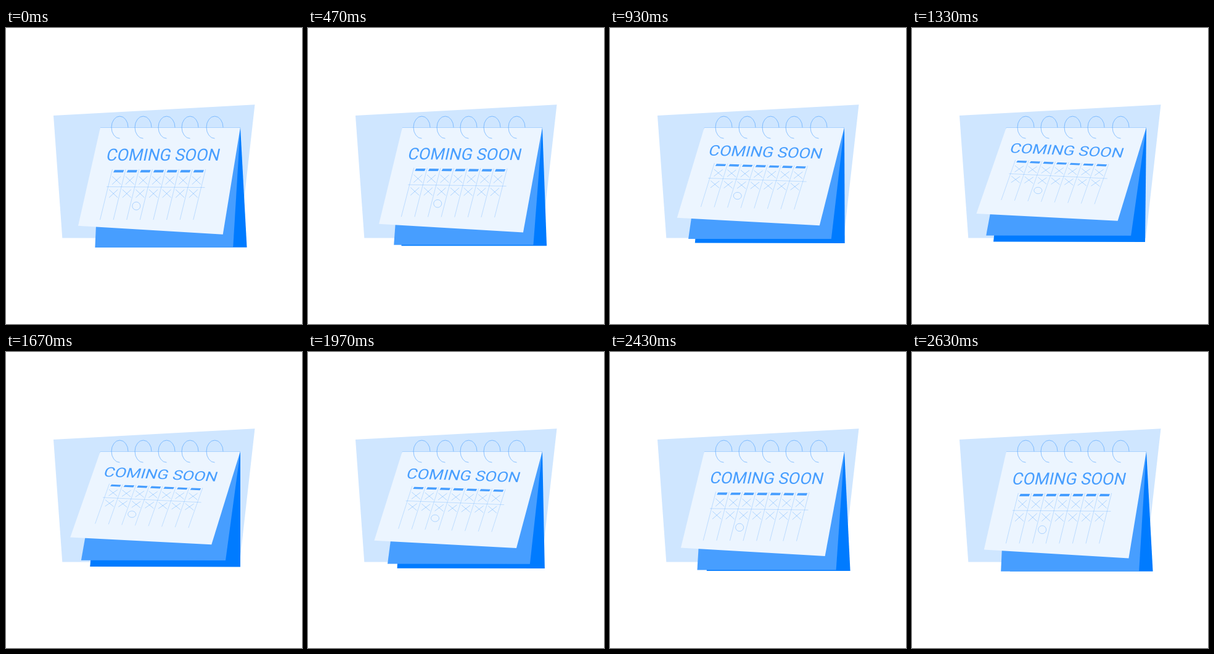
Animation of 480 by 480 pixels, one loop 2670 ms. Source, as an HTML page:

```html
<!DOCTYPE html>
<html lang="en">
<head>
<meta charset="utf-8">
<title>Coming soon calendar</title>
<style>
  html, body { margin: 0; height: 100%; overflow: hidden; background: #fff; }
  svg { display: block; width: 100%; height: 100%; }
  .thin { fill: none; stroke: #479eff; stroke-width: .4; }
  text { font: 27px Roboto, sans-serif; fill: #479eff; }
</style>
</head>
<body>
<svg viewBox="0 0 480 480">
  <path fill="#cfe6ff" d="M77 142 403.5 124.3 379 341 91.3 340.5z"/>
  <path id="back" fill="#007bff"/>
  <path id="middle" fill="#479eff"/>
  <path id="front" fill="#ecf5ff"/>
  <path class="thin" d="M153 161.5H380"/>
  <g id="content">
    <text transform="translate(161.4 215) skewX(-12)" textLength="auto">COMING SOON</text>
    <path id="bars" fill="#479eff"/>
    <path id="grid" class="thin" opacity=".75"/>
    <path id="crosses" class="thin"/>
    <circle class="thin" cx="211.3" cy="288.6" r="6.5"/>
  </g>
  <path id="rings" class="thin" style="stroke-width: .6"/>
</svg>
<script>
const LOOP = 2670;
const $ = id => document.getElementById(id);
const mix = (a, b, p) => a + (b - a) * p;
const smooth = (from, to, t) => {
  const u = Math.min(1, Math.max(0, (t - from) / (to - from)));
  return u * u * (3 - 2 * u);
};

// Bottom corners [left x, y, right x, y] at rest and lifted; times of rise and fall.
const sheets = [
  { id: 'back', rest: [159, 355.7, 390.6, 355.8], lifted: [132, 346.5, 378, 347], rise: [20, 1320], fall: [1340, 2660] },
  { id: 'middle', rest: [144.4, 355.9, 368.2, 355.9], lifted: [120, 336.3, 355, 336.5], rise: [80, 1400], fall: [1460, 2700] },
  { id: 'front', rest: [117, 320.8, 351.7, 334.8], lifted: [104, 300.3, 333, 312], rise: [150, 1470], fall: [1590, 2720] },
];
const restMatrix = [1, 0, 0, 1, 0, 0];
const liftedMatrix = [1, .045, -.038, .8, 3.8, 22.3];

const cross = (x, y) => `M${x - 7} ${y - 6.5}l14 13m0-13l-14 13`;
let bars = '', crosses = '', grid = 'M163 257.4 322.5 258.6';
for (let i = 0; i < 8; i++) {
  const x = i * 21.6;
  grid += `M${172.5 + x} 229l-20 82`;
  if (i === 7) break;
  bars += `M${174 + x} 234.3l2-4h15.4l-1.6 4z`;
  crosses += cross(179.2 + x, 247.1) + cross(174.2 + x, 268.5);
}
$('bars').setAttribute('d', bars);
$('grid').setAttribute('d', grid);
$('crosses').setAttribute('d', crosses);
$('rings').setAttribute('d', [184.5, 222.5, 260.5, 298.5, 338.5]
  .map(x => `M${x} 179.1A13.5 18 0 1 1 ${x + 13.5} 161.3`).join(''));
$('content').querySelector('text').removeAttribute('textLength');

function draw(now) {
  const t = now % LOOP;
  for (const { id, rest, lifted, rise, fall } of sheets) {
    const p = smooth(...rise, t) - smooth(...fall, t);
    const [lx, ly, rx, ry] = rest.map((v, i) => mix(v, lifted[i], p));
    $(id).setAttribute('d', `M153 161H380L${rx} ${ry} ${lx} ${ly}z`);
    if (id === 'front') {
      const matrix = restMatrix.map((v, i) => mix(v, liftedMatrix[i], p));
      $('content').setAttribute('transform', `matrix(${matrix})`);
    }
  }
  requestAnimationFrame(draw);
}
draw(performance.now());
</script>
</body>
</html>
```
